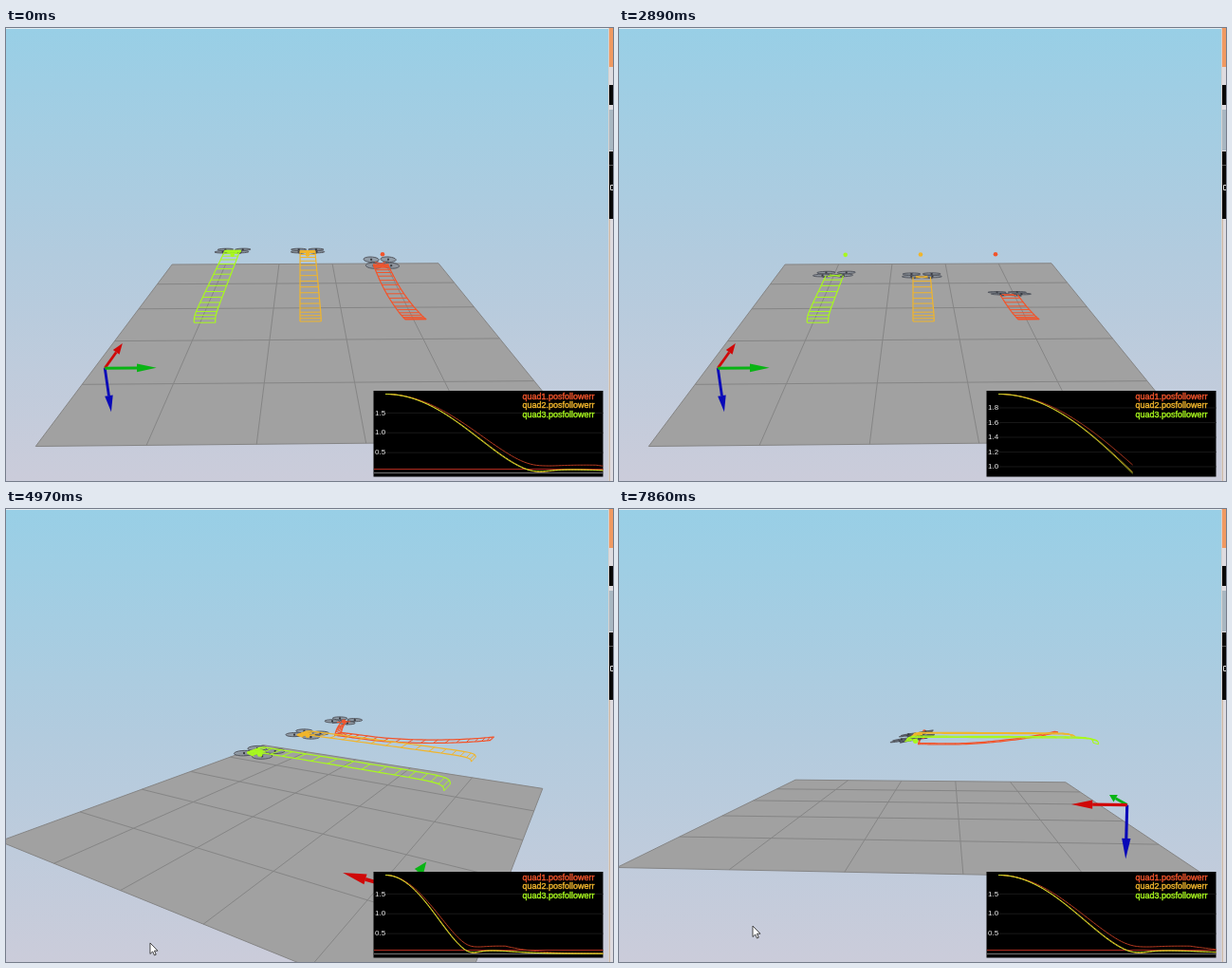
Recreate the animation shown at these times as an HTML page with a canvas. Size 640 by 477 pixels, loop 8000 ms.

```html
<!DOCTYPE html>
<html>
<head>
<meta charset="utf-8">
<style>
html, body { margin: 0; width: 100%; height: 100%; overflow: hidden; }
canvas { display: block; }
</style>
</head>
<body>
<canvas id="stage" width="640" height="477"></canvas>
<script>
const ctx = document.getElementById('stage').getContext('2d');
const LOOP = 8000, STEP = 131, FOCAL = 520, RATE = 0.00089;
const RUNS = [-1570, 2225, 6135];          // start of each simulated flight

// time, heading, pitch, distance
const CAMERA = [
  [4180, 0.8, 18.06, 6.57], [4970, 59, 13.5, 6.1], [5370, 77, 1.5, 6.35],
  [5760, 83.8, -5.5, 6.55], [6150, 86, -1, 6.57], [6510, 86.7, 3.6, 6.57]
];
const CURSOR = [[3900, 152, 457], [4970, 152, 457], [5400, 150, 455], [7080, 150, 455], [7330, 141, 439]];
// flight time, nose-down angle
const TILT = [[0, 0], [0.1, 35], [0.45, 34], [0.62, 8], [0.85, -30], [1.16, -33],
  [1.39, 10], [1.6, 9], [1.9, 0]];

const QUADS = [
  { name: 'quad1', color: '#f2542b', y: 1, lag: 0.95, sag: 0.19, lift: 0 },
  { name: 'quad2', color: '#f0b52c', y: 0, lag: 1, sag: 0, lift: 0.035 },
  { name: 'quad3', color: '#a8f81e', y: -1, lag: 1.01, sag: 0, lift: 0.05 }
];

const clamp = v => Math.min(1, Math.max(0, v));

function mix(keys, t) {
  let i = 1;
  while (i < keys.length - 1 && keys[i][0] < t) i++;
  const a = keys[i - 1], b = keys[i], k = clamp((t - a[0]) / (b[0] - a[0]));
  return a.slice(1).map((v, j) => v + (b[j + 1] - v) * k);
}

// Signed distance left to the goal
function gap(T) {
  if (T > 1) return -1.1 * (T - 1) * Math.exp((1 - T) / 0.22);
  return 2 - 2 * T * T * (1.78 - 0.78 * T ** 2.3);
}

function height(q, T) {
  const s = clamp(T / 0.8), drop = q.sag * s * s * (3 - 2 * s);
  const fade = start => Math.exp(-3 * Math.max(0, T - start));
  return q.lift * (1 - 1.4 * Math.exp(-12 * T)) * fade(1) - drop * fade(1.35);
}

const position = (q, T) => [-gap(T * q.lag), q.y, height(q, T)];
const error = (q, T) => Math.hypot(gap(T * q.lag), height(q, T), 0.02);

let view;
function setCamera(t) {
  const [h, p, dist] = mix(CAMERA, t), rad = Math.PI / 180;
  view = { sh: Math.sin(h * rad), ch: Math.cos(h * rad), sp: Math.sin(p * rad), cp: Math.cos(p * rad), dist };
}

// World point (forward, right, up) to [x, y, depth]
function project([x, y, z]) {
  const { sh, ch, sp, cp, dist } = view;
  const f = x * ch + y * sh, side = y * ch - x * sh;
  const depth = dist + f * cp - z * sp;
  return [318 + FOCAL * side / depth, 238.5 - FOCAL * (z * cp + f * sp) / depth, depth];
}

function trace(points, closed) {
  ctx.beginPath();
  points.forEach(p => ctx.lineTo(p[0], p[1]));
  if (closed) ctx.closePath();
}

function line(points, color, width = 1) {
  trace(points);
  ctx.strokeStyle = color;
  ctx.lineWidth = width;
  ctx.stroke();
}

function fill(points, color) {
  trace(points, true);
  ctx.fillStyle = color;
  ctx.fill();
}

function rect(x, y, w, h, color) {
  ctx.fillStyle = color;
  ctx.fillRect(x, y, w, h);
}

function drawSky() {
  const g = ctx.createLinearGradient(0, 0, 0, 477);
  g.addColorStop(0, '#98cfe6');
  g.addColorStop(0.5, '#b2cbde');
  g.addColorStop(1, '#cbccda');
  rect(0, 0, 640, 477, g);
}

function drawGround() {
  const at = (x, y) => project([x, y, -1]), e = 2.5;
  fill([at(-e, -e), at(e, -e), at(e, e), at(-e, e)], '#a1a1a1');
  for (let i = -e; i <= e; i++) {
    line([at(i, -e), at(i, e)], '#858585');
    line([at(-e, i), at(e, i)], '#858585');
  }
}

function drawAxes() {
  const o = [-2, -2, -0.5], from = project(o);
  const axes = [['#d00808', 0.5, 0, 0], ['#08b414', 0, 0.5, 0], ['#0808b8', 0, 0, -0.5]].map(([color, ...v]) => {
    const along = k => project(o.map((c, i) => c + v[i] * k));
    return { color, neck: along(0.62), tip: along(1) };
  });
  axes.sort((a, b) => b.tip[2] - a.tip[2]);
  for (const { color, neck, tip } of axes) {
    const a = Math.atan2(tip[1] - neck[1], tip[0] - neck[0]), r = 21 / neck[2];
    const nx = -Math.sin(a) * r, ny = Math.cos(a) * r;
    line([from, neck], color, 14 / neck[2]);
    fill([[neck[0] + nx, neck[1] + ny], tip, [neck[0] - nx, neck[1] - ny]], color);
  }
}

function drawDrone(q, T) {
  const c = position(q, T), a = mix(TILT, T * q.lag)[0] * Math.PI / 180;
  const at = (p, s, up = 0) => project([
    c[0] + p * Math.cos(a) + up * Math.sin(a), c[1] + s, c[2] - p * Math.sin(a) + up * Math.cos(a)]);
  const arm = 0.118;
  line([at(-arm, -arm), at(arm, arm)], '#4b4d55', 1.6);
  line([at(-arm, arm), at(arm, -arm)], '#4b4d55', 1.6);
  for (const i of [1, -1]) for (const j of [-1, 1]) {
    const rim = Array.from({ length: 20 }, (_, k) =>
      at(i * arm + 0.105 * Math.cos(k * Math.PI / 10), j * arm + 0.105 * Math.sin(k * Math.PI / 10), 0.02));
    fill(rim, 'rgba(138,145,155,.82)');
    ctx.strokeStyle = '#53575f';
    ctx.lineWidth = 1;
    ctx.stroke();
    const hub = at(i * arm, j * arm, 0.02);
    rect(hub[0] - 1, hub[1] - 1, 2, 2, '#3a3c42');
  }
  const b = 0.05;
  fill([at(-b, -b), at(b, -b), at(b, b), at(-b, b)], '#5d6590');
  line([at(-0.07, -0.07), at(0.07, 0.07)], q.color);
  line([at(-0.07, 0.07), at(0.07, -0.07)], q.color);
}

function drawTrail(q, T) {
  const edge = (s, side) => {
    const p = position(q, s);
    p[1] += side * 0.1;
    return project(p);
  };
  for (const side of [-1, 1]) {
    const pts = [];
    for (let s = 0; s < T; s += 0.02) pts.push(edge(s, side));
    pts.push(edge(T, side));
    line(pts, q.color, 1.2);
  }
  for (let s = 0; s < Math.min(T, 1.8); s += 0.06) line([edge(s, -1), edge(s, 1)], q.color);
}

function drawQuads(T) {
  const order = [...QUADS].sort((a, b) => project([0, b.y, 0])[2] - project([0, a.y, 0])[2]);
  for (const q of order) {
    const goal = project([0, q.y, 0]);
    drawDrone(q, T);
    drawTrail(q, T);
    ctx.fillStyle = q.color;
    ctx.beginPath();
    ctx.arc(goal[0], goal[1], 15 / goal[2], 0, 7);
    ctx.fill();
  }
}

function drawGraph(T) {
  ctx.save();
  ctx.beginPath();
  ctx.rect(387.5, 382, 242, 90.5);
  ctx.clip();
  rect(387, 382, 243, 91, '#000');

  const samples = 160, span = Math.max(0.95, T);
  const curves = QUADS.map(q => Array.from({ length: samples + 1 }, (_, i) => error(q, T * i / samples)));
  let low = Math.min(1.9, ...curves.flat());
  if (low < 0.1) low = 0;
  const X = s => 400 + 230 * s / span, Y = v => 384.5 + (2 - v) * 83.5 / (2 - low);

  ctx.font = '8px "Liberation Sans", Arial, sans-serif';
  ctx.textBaseline = 'middle';
  ctx.textAlign = 'left';
  const range = 2 - low, tick = range > 1.2 ? 0.5 : range > 0.6 ? 0.2 : 0.1;
  for (let v = 2 - tick; v > low; v -= tick) {
    const y = Y(v);
    if (y < 391 || y > 468) continue;
    line([[388, y], [630, y]], '#181818');
    ctx.fillStyle = '#e8e8e8';
    ctx.fillText(v.toFixed(1), 389, y);
  }

  if (!low) {
    line([[388, 468.5], [630, 468.5]], '#777');
    if (T < 2.8) line([[388, 464.5], [630, 464.5]], '#b02c20');
    else {
      ctx.strokeStyle = '#18b818';
      ctx.lineWidth = 1;
      for (const s of [0.98, 1.34, 1.6]) ctx.strokeRect(X(s), 464.5, 250, 7.5);
    }
  }

  curves.forEach((c, i) =>
    line(c.map((v, k) => [X(T * k / samples), Y(v) + 1]), ['#b83a20', '#d8a028', '#ccdc28'][i]));

  ctx.font = '9px "Liberation Sans", Arial, sans-serif';
  ctx.textAlign = 'right';
  ctx.lineWidth = 0.4;
  QUADS.forEach((q, i) => {
    const at = [q.name + '.posfollowerr', 620.5, 388.5 + i * 9.5];
    ctx.fillStyle = ctx.strokeStyle = q.color;
    ctx.fillText(...at);
    ctx.strokeText(...at);
  });
  ctx.restore();
}

// Sliver of the window behind
function drawBorder() {
  rect(0, 0, 636, 1, '#e4ecf0');
  rect(635, 0, 1, 477, '#d6d2d0');
  rect(636, 0, 4, 477, '#dedce0');
  rect(636, 201, 1, 276, '#cdb9a6');
  rect(636, 0, 4, 41, '#f09a62');
  rect(636, 60, 4, 21, '#080808');
  rect(636, 86, 4, 43, '#a9b7c2');
  rect(636, 130, 4, 71, '#080808');
  rect(636, 144, 4, 1, '#555');
  ctx.strokeStyle = '#ddd';
  ctx.lineWidth = 1;
  ctx.strokeRect(637.5, 165.5, 5, 5);
}

function drawCursor(t) {
  if (t < CURSOR[0][0]) return;
  const [x, y] = mix(CURSOR, t);
  const shape = [0, 0, 0, 11.5, 2.7, 9, 4.5, 13, 6.3, 12.2, 4.5, 8.2, 8, 8.2];
  const pts = [];
  for (let i = 0; i < shape.length; i += 2) pts.push([x + shape[i], y + shape[i + 1]]);
  fill(pts, '#fff');
  ctx.strokeStyle = '#333';
  ctx.lineWidth = 0.9;
  ctx.stroke();
}

function draw(now) {
  // The picture advances in steps of STEP ms
  const t = Math.floor((now % LOOP + 14) / STEP) * STEP;
  const T = (t - RUNS.filter(s => s <= t).pop()) * RATE;
  ctx.lineJoin = 'round';
  setCamera(t);
  drawSky();
  drawGround();
  drawAxes();
  drawQuads(T);
  drawGraph(T);
  drawBorder();
  drawCursor(t);
}

let start;
function loop(now) {
  start ??= now;
  draw(now - start);
  requestAnimationFrame(loop);
}
requestAnimationFrame(loop);
</script>
</body>
</html>
```
